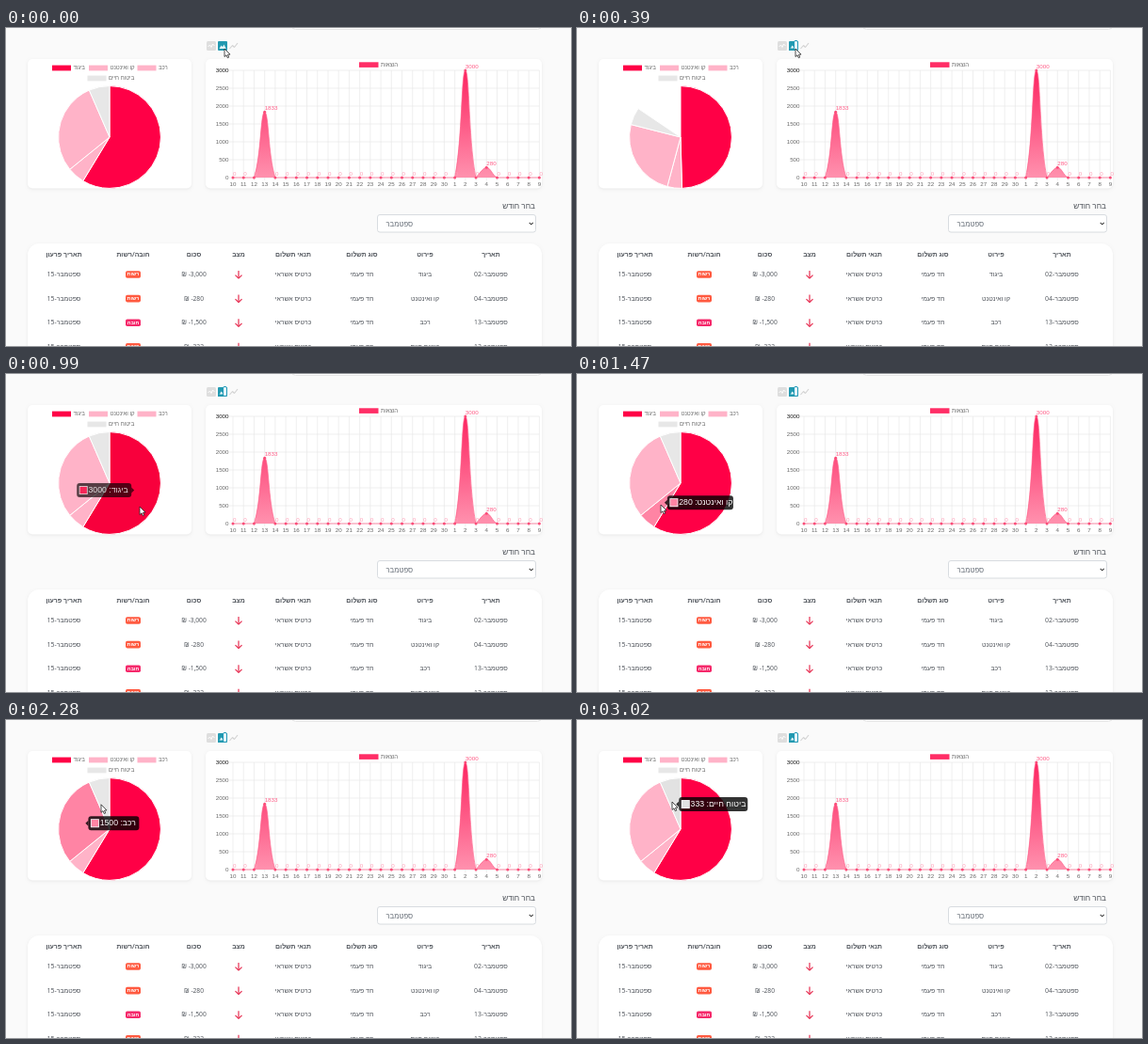
Recreate the animation shown at these times as an HTML page with a canvas. Size 600 by 338 pixels, loop 3520 ms.

```html
<!DOCTYPE html>
<html lang="he">
<head>
<meta charset="utf-8">
<style>
html, body { margin: 0; width: 100%; height: 100%; overflow: hidden; background: #fafafa; }
canvas { display: block; width: 600px; height: 338px; }
</style>
</head>
<body>
<canvas id="stage" width="600" height="338"></canvas>
<script>
const ctx = document.getElementById('stage').getContext('2d');
const LOOP = 3520;
const PAGE = '"Open Sans", "Liberation Sans", sans-serif';
const CHART = '"Liberation Sans", Arial, sans-serif';
const TAU = Math.PI * 2;

const pie = { x: 110, y: 116, r: 54.4, start: 30, duration: 970 };
const slices = [
  { name: 'ביגוד', value: 3000, color: '#ff0046', hover: '#f8003c', legend: [49, 42.5], tipWidth: 58 },
  { name: 'קו ואינטנט', value: 280, color: '#ffb3c8', hover: '#ff84a4', legend: [88, 42.5], tipWidth: 70 },
  { name: 'רכב', value: 1500, color: '#ffb3c8', hover: '#ff84a4', legend: [139.5, 42.5], tipWidth: 54 },
  { name: 'ביטוח חיים', value: 333, color: '#e7e7e7', hover: '#e2e2e2', legend: [86.5, 53.5], tipWidth: 73 }
];
const total = slices.reduce((sum, s) => sum + s.value, 0);
let angle = 0;
for (const s of slices) {
  s.from = angle;
  s.to = angle += s.value / total * TAU;
  const mid = (s.from + s.to) / 2;
  const anchorX = pie.x + Math.sin(mid) * pie.r / 2;
  s.flip = anchorX > pie.x;
  s.tip = {
    x: s.flip ? anchorX - 3 - s.tipWidth : anchorX + 3.8,
    y: pie.y - Math.cos(mid) * pie.r / 2 - 7.3,
    w: s.tipWidth
  };
}

// When the pointer enters each slice, and where the pointer is (ms, x, y).
const hoverTimes = [850, 1110, 1790, 2284];
const pointerPath = [
  [0, 232, 22], [600, 232, 22], [950, 142, 141], [1010, 142, 141], [1120, 95, 139],
  [1200, 89, 139], [1720, 89, 139], [1950, 86, 123], [2270, 101, 90], [2450, 101, 87]
];

const clamp = v => Math.max(0, Math.min(1, v));
const lerp = (a, b, k) => a + (b - a) * k;
const easeOutQuart = k => 1 - (1 - clamp(k)) ** 4;

function text(str, x, y, { size = 6.9, font = PAGE, color = '#4c5158', weight = 400, align = 'center', dir = 'ltr' } = {}) {
  ctx.font = `${weight} ${size}px ${font}`;
  ctx.fillStyle = color;
  ctx.textAlign = align;
  ctx.textBaseline = 'middle';
  ctx.direction = dir;
  ctx.fillText(str, x, y);
}

function box(x, y, w, h, r, fill, stroke) {
  ctx.beginPath();
  ctx.roundRect(x, y, w, h, r);
  if (fill) { ctx.fillStyle = fill; ctx.fill(); }
  if (stroke) { ctx.strokeStyle = stroke; ctx.stroke(); }
}

function card(x, y, w, h, r) {
  ctx.save();
  ctx.shadowColor = 'rgba(0,0,0,.07)';
  ctx.shadowBlur = 3;
  ctx.shadowOffsetY = 1;
  box(x, y, w, h, r, '#fff');
  ctx.restore();
}

function polyline(points, color, width = 1) {
  ctx.beginPath();
  points.forEach(([x, y]) => ctx.lineTo(x, y));
  ctx.strokeStyle = color;
  ctx.lineWidth = width;
  ctx.stroke();
  ctx.lineWidth = 1;
}

function drawIcons(t) {
  box(213, 14, 10, 10, 1.5, '#dedede');
  polyline([[214.5, 20], [216.5, 18], [218, 20.5], [219.5, 17], [221.5, 19]], '#fff', .9);
  box(225, 14, 10, 10, 1, '#2299b0');
  ctx.beginPath();
  [[226.5, 22], [228.5, 18.5], [230, 20], [231.5, 17.5], [233.7, 22]].forEach(p => ctx.lineTo(...p));
  ctx.fillStyle = '#e4f5f7';
  ctx.fill();
  if (t >= pie.start) {
    box(230.5, 13.5, 4, 10, 1.5, '#e3f4f9', '#2299b8');
    box(225, 21.5, 6, 2.5, 0, '#2299b0');
  }
  polyline([[237.5, 22], [240.5, 18.5], [242.5, 20.5], [246, 16]], '#d2d2d2', 1.1);
}

// Bezier handles of a cardinal spline whose tension is shared by segment length.
function splineHandles(points, tension, floor) {
  return points.map(([x, y], i) => {
    const [x0, y0] = points[i - 1] || points[i];
    const [x1, y1] = points[i + 1] || points[i];
    const before = Math.hypot(x - x0, y - y0), after = Math.hypot(x1 - x, y1 - y);
    const handle = share => [x + share * (x1 - x0), Math.min(floor, y + share * (y1 - y0))];
    const unit = tension / (before + after);
    return { into: handle(-unit * before), out: handle(unit * after) };
  });
}

function drawLineChart() {
  const left = 241, step = 11.22, base = 159, perUnit = .038;
  const values = Array(30).fill(0);
  values[3] = 1833; values[22] = 3000; values[24] = 280;
  const px = i => left + i * step;
  const py = v => base - v * perUnit;
  const label = { size: 6.2, font: CHART, color: '#666' };

  box(375, 36.3, 20.5, 5.6, 0, '#ff2e66');
  text('הוצאות', 398, 39.5, { ...label, size: 6, align: 'left' });

  for (let v = 0; v <= 3000; v += 500) {
    polyline([[237, py(v)], [px(29), py(v)]], '#e8e8e8', .7);
    text(v, 236.5, py(v), { ...label, align: 'right' });
  }
  text(3000, 236.5, py(3000), { ...label, align: 'right' });
  values.forEach((v, i) => {
    polyline([[px(i), 45], [px(i), 162]], '#e8e8e8', .7);
    text(i < 21 ? i + 10 : i - 20, px(i), 165.8, label);
  });

  const fill = ctx.createLinearGradient(0, 45, 0, base);
  fill.addColorStop(0, '#fc2460');
  fill.addColorStop(1, '#ff91ae');
  const points = values.map((v, i) => [px(i), py(v)]);
  const handles = splineHandles(points, .4, base);
  ctx.beginPath();
  ctx.moveTo(...points[0]);
  for (let i = 1; i < points.length; i++) {
    ctx.bezierCurveTo(...handles[i - 1].out, ...handles[i].into, ...points[i]);
  }
  ctx.fillStyle = fill;
  ctx.fill();
  ctx.strokeStyle = '#ff5f88';
  ctx.lineWidth = .7;
  ctx.stroke();
  ctx.lineWidth = 1;

  values.forEach((v, i) => {
    ctx.beginPath();
    ctx.arc(px(i), py(v), 1.5, 0, TAU);
    ctx.fillStyle = '#fb4d79';
    ctx.fill();
    text(v, px(i), py(v) - 4.2, { ...label, align: 'left', color: v ? '#ff5c86' : '#ff9db6' });
  });
}

function drawPie(t, active) {
  const grow = t < pie.start ? 1 : easeOutQuart((t - pie.start) / pie.duration);
  for (const s of slices) {
    const [lx, ly] = s.legend;
    box(lx, ly - 2.9, 20, 5.8, 0, s.color);
    text(s.name, lx + 22.5, ly, { size: 6, font: CHART, color: '#666', align: 'left' });
  }
  slices.forEach((s, i) => {
    ctx.beginPath();
    ctx.moveTo(pie.x, pie.y);
    ctx.arc(pie.x, pie.y, pie.r, s.from * grow - TAU / 4, s.to * grow - TAU / 4);
    ctx.closePath();
    ctx.fillStyle = i === active ? s.hover : s.color;
    ctx.fill();
    ctx.strokeStyle = '#fff';
    ctx.lineJoin = 'bevel';
    ctx.stroke();
  });
}

function drawTooltip(t, active) {
  if (active < 0) return;
  const s = slices[active];
  const k = easeOutQuart((t - hoverTimes[active]) / 400);
  const previous = active ? slices[active - 1].tip : s.tip;
  const [x, y, w] = ['x', 'y', 'w'].map(key => lerp(previous[key], s.tip[key], k));
  ctx.save();
  ctx.globalAlpha = active ? 1 : k;
  box(x, y, w, 15, 3, 'rgba(0,0,0,.8)');
  const edge = s.flip ? x + w : x, out = s.flip ? 3 : -3;
  ctx.beginPath();
  [[edge, y + 4.5], [edge + out, y + 7.5], [edge, y + 10.5]].forEach(p => ctx.lineTo(...p));
  ctx.fill();
  box(x + 2.5, y + 3, 9, 9, 0, '#fff');
  box(x + 3.3, y + 3.8, 7.4, 7.4, 0, s.hover);
  text(`${s.name}: ${s.value}`, x + 12.3, y + 7.5, { size: 8.7, font: CHART, color: '#fff', align: 'left' });
  ctx.restore();
}

function drawTable() {
  card(23, 229, 546, 140, 12);
  const columns = [515, 445, 378, 305, 247, 199.5, 135, 61.5];
  const heads = ['תאריך', 'פירוט', 'סוג תשלום', 'תנאי תשלום', 'מצב', 'סכום', 'חובה/רשות', 'תאריך פרעון'];
  heads.forEach((h, i) => text(h, columns[i], 241, { weight: 600, dir: 'rtl' }));
  const rows = [['02', 0, '3,000'], ['04', 1, '280'], ['13', 2, '1,500'], ['13', 3, '333']];
  rows.forEach(([day, item, amount], i) => {
    const y = 262 + i * 25.6;
    const cell = (str, column) => text(str, columns[column], y + .3, { dir: 'rtl' });
    cell('ספטמבר-' + day, 0);
    cell(slices[item].name, 1);
    cell('חד פעמי', 2);
    cell('כרטיס אשראי', 3);
    polyline([[247, y - 4], [247, y + 4]], '#e62d50', 1.2);
    polyline([[243.5, y + .6], [247, y + 4.1], [250.5, y + .6]], '#e62d50', 1.2);
    text(`₪ -${amount}`, columns[5], y + .3, { size: 6.7 });
    const required = i === 2;
    box(127, y - 3.8, 16, 7.6, 1.8, required ? '#f5286a' : '#ff5a40');
    text(required ? 'חובה' : 'רשות', 135, y, { size: 5.4, weight: 700, color: '#fff' });
    cell('ספטמבר-15', 7);
  });
}

function drawPage() {
  ctx.fillStyle = '#fafafa';
  ctx.fillRect(0, 0, 600, 338);
  box(303.5, -20, 265, 21.5, 4, '#fff', '#e6e6e6');
  card(23, 33, 174, 137.5, 5);
  card(212, 33, 357, 137.5, 5);
  text('בחר חודש', 562, 189.8, { size: 8.2, align: 'right', dir: 'rtl' });
  box(394.5, 198.5, 168, 18.5, 2.5, '#fff', '#d8dce0');
  text('ספטמבר', 403.5, 208.8, { size: 7.7, color: '#666e77', align: 'left' });
  polyline([[555.7, 206.8], [557.7, 208.9], [559.7, 206.8]], '#444', 1.1);
  drawTable();
}

function drawPointer(t) {
  let i = pointerPath.findIndex(p => p[0] > t);
  if (i < 0) i = pointerPath.length;
  const a = pointerPath[i - 1], b = pointerPath[i] || a;
  const k = b === a ? 0 : (t - a[0]) / (b[0] - a[0]);
  ctx.save();
  ctx.translate(lerp(a[1], b[1], k), lerp(a[2], b[2], k));
  ctx.beginPath();
  [[0, 0], [0, 8.5], [2, 6.8], [3.3, 9.7], [4.7, 9.1], [3.5, 6.3], [6, 6.1]].forEach(p => ctx.lineTo(...p));
  ctx.closePath();
  ctx.fillStyle = '#fff';
  ctx.fill();
  ctx.strokeStyle = '#222';
  ctx.lineWidth = .8;
  ctx.stroke();
  ctx.restore();
}

const begin = performance.now();
function frame() {
  const t = (performance.now() - begin) % LOOP;
  const active = hoverTimes.filter(h => t >= h).length - 1;
  drawPage();
  drawIcons(t);
  drawLineChart();
  drawPie(t, active);
  drawTooltip(t, active);
  drawPointer(t);
  requestAnimationFrame(frame);
}
frame();
</script>
</body>
</html>
```
